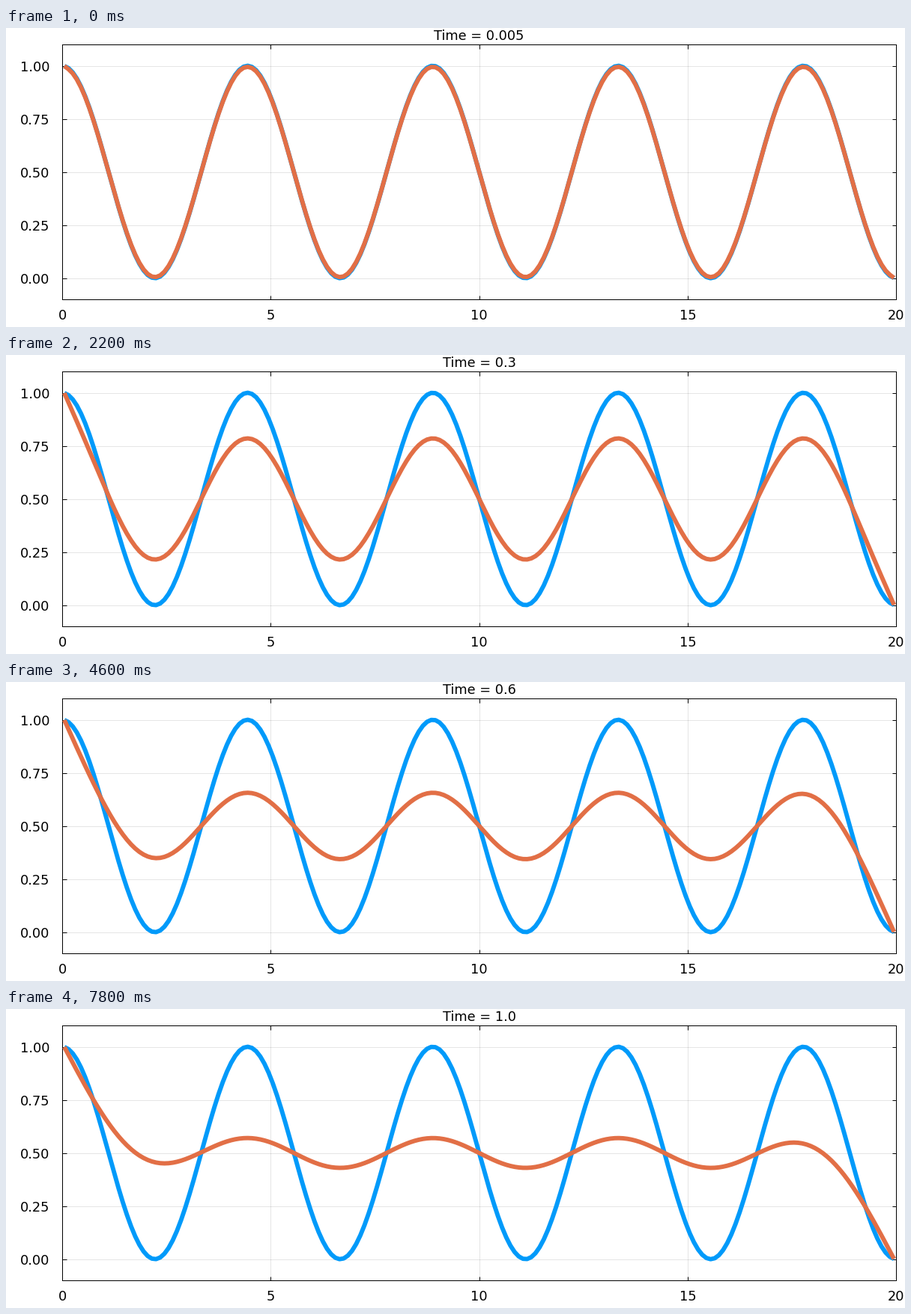
These frames come from a looping animation (1200 by 400 pixels, 8 s). A matplotlib script:

```python
import matplotlib.pyplot as plt
import numpy as np
from matplotlib.animation import FuncAnimation

W, H, DPI = 1200, 400, 100
LEFT, RIGHT, TOP, BOTTOM = 75.1, 1188.1, 22.1, 363.1
FRAMES, INTERVAL = 40, 200

LENGTH, CELLS = 20.0, 200
DX = LENGTH / CELLS
DT = 0.005
STEPS_PER_FRAME = 5


def pt(px):
    return px * 72 / DPI


def diffuse(u):
    """One explicit heat equation step with both end values held."""
    out = u.copy()
    out[1:-1] += DT / DX**2 * (u[2:] - 2 * u[1:-1] + u[:-2])
    return out


def simulate(u):
    states = []
    for step in range(1, FRAMES * STEPS_PER_FRAME + 1):
        u = diffuse(u)
        if step % STEPS_PER_FRAME == 1:
            states.append(u)
    return states


def time_label(frame):
    t = DT * (1 + STEPS_PER_FRAME * frame)
    return f"Time = {float(f'{t:.1g}')}"


x = (np.arange(CELLS) + 0.5) * DX
start = 0.5 + 0.5 * np.cos(2 * np.pi * 4.5 * x / LENGTH)
states = simulate(start)

plt.rcParams["font.family"] = "DejaVu Sans"
fig = plt.figure(figsize=(W / DPI, H / DPI), dpi=DPI, facecolor="white")
ax = fig.add_axes([LEFT / W, 1 - BOTTOM / H, (RIGHT - LEFT) / W, (BOTTOM - TOP) / H])
ax.set(xlim=(0, LENGTH), ylim=(-0.1, 1.1))
ax.set_xticks(range(0, 21, 5))
ax.set_yticks(np.linspace(0, 1, 5))
ax.yaxis.set_major_formatter("{x:.2f}")
ax.set_axisbelow(True)
ax.grid(color="black", alpha=0.1, linewidth=pt(1))
ax.tick_params(direction="in", top=True, right=True, length=pt(5.5),
               width=pt(1), labelsize=pt(17.8))
ax.tick_params(axis="x", pad=pt(13))
ax.tick_params(axis="y", pad=pt(17))
for spine in ax.spines.values():
    spine.set_linewidth(pt(1))
    spine.set_zorder(1)

style = dict(linewidth=pt(5.9), solid_capstyle="butt", solid_joinstyle="round")
ax.plot(x, start, color="#009AFA", **style)
curve, = ax.plot(x, states[0], color="#E26F46", **style)
title = fig.text((LEFT + RIGHT) / 2 / W, 1 - 15.5 / H, time_label(0),
                 ha="center", va="baseline", fontsize=pt(17.8))


def update(frame):
    curve.set_ydata(states[frame])
    title.set_text(time_label(frame))
    return curve, title


anim = FuncAnimation(fig, update, frames=FRAMES, interval=INTERVAL,
                     init_func=lambda: update(0), repeat=True, repeat_delay=0)
plt.show()
```
